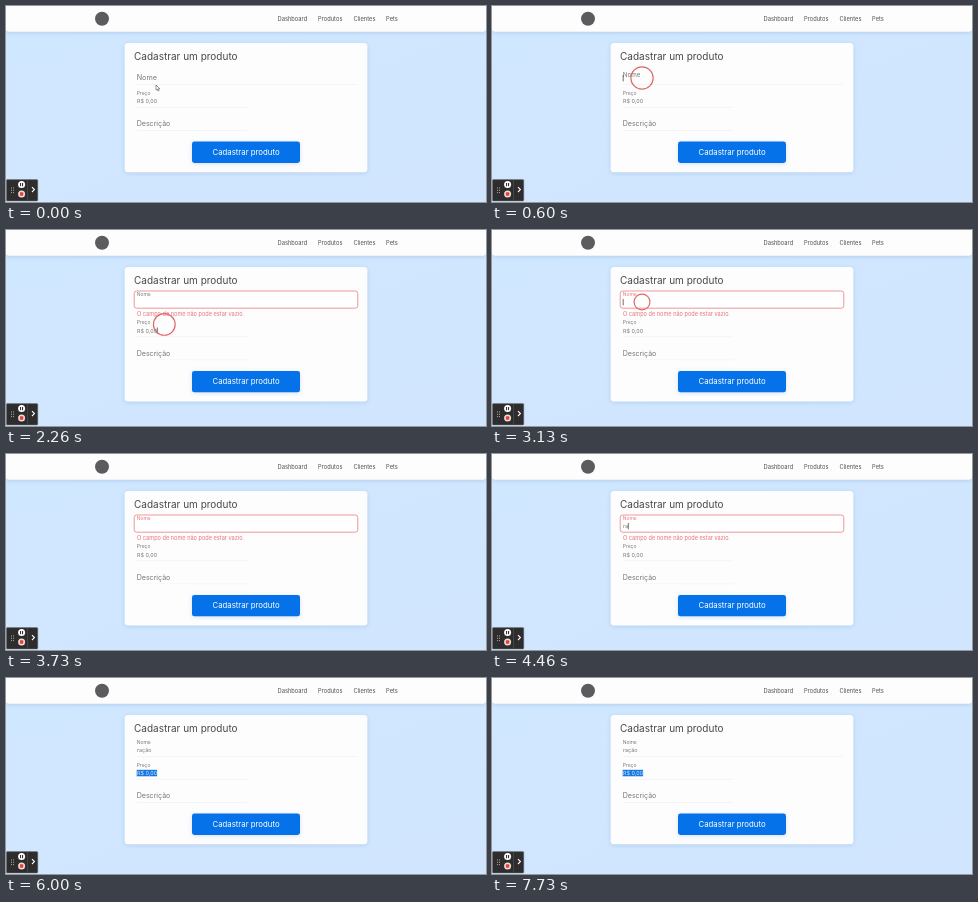
An HTML page for the animation above (8000 ms loop, 480 by 196 pixels).

```html
<!DOCTYPE html>
<html lang="pt-BR">
<head>
<meta charset="utf-8">
<title>Cadastrar um produto</title>
<style>
html, body { margin: 0; width: 100%; height: 100%; overflow: hidden; }
svg { display: block; width: 480px; height: 196px; font-family: Inter, Roboto, sans-serif; }
text { fill: #777; white-space: pre; }
.nav { font-size: 5.75px; fill: #505050; }
.title { font-size: 10px; fill: #484848; }
.field { font-size: 7.05px; }
.label { font-size: 5px; }
.value { font-size: 5.45px; }
.error { font-size: 5.6px; fill: #e8737b; }
.button { font-size: 7.8px; fill: #fff; }
.line { stroke: #eceeef; stroke-width: .6; }
.soft { filter: drop-shadow(0 1px 2px rgba(60, 110, 170, .2)); }
</style>
</head>
<body>
<svg viewBox="0 0 480 196">
  <defs>
    <linearGradient id="sky" x2="1" y2="1">
      <stop stop-color="#cfe7ff"/><stop offset="1" stop-color="#d1e6fe"/>
    </linearGradient>
  </defs>
  <rect width="480" height="196" fill="url(#sky)"/>

  <rect class="soft" y="-6" width="480" height="31.7" rx="3" fill="#fdfdfe"/>
  <circle cx="96" cy="12.7" r="7" fill="#5b5b60"/>
  <g class="nav">
    <text class="nav" x="271.5" y="15">Dashboard</text>
    <text class="nav" x="312" y="15">Produtos</text>
    <text class="nav" x="347.5" y="15">Clientes</text>
    <text class="nav" x="380" y="15">Pets</text>
  </g>

  <rect id="card" class="soft" x="118.6" y="37" width="242.8" height="129.2" rx="3.5" fill="#fdfdfe"/>
  <text class="title" x="128" y="54.3">Cadastrar um produto</text>

  <path id="nameLine" class="line" d="M131 78.5H351"/>
  <rect id="errorBox" x="128.2" y="61" width="223.6" height="17.2" rx="2.6" fill="#fff" stroke="#eb8d90" stroke-width=".9"/>
  <text id="nameLabel" x="130.7">Nome</text>
  <text id="name" class="value" x="131" y="74"></text>
  <text id="errorText" class="error" x="131" y="86.1">O campo de nome não pode estar vazio.</text>

  <g id="rest">
    <text class="label" x="130.7" y="89.1">Preço</text>
    <rect id="selection" x="130.7" y="91.8" width="20.4" height="6.5" fill="#1878df"/>
    <text id="price" class="value" x="131" y="97.2">R$ 0,00</text>
    <path class="line" d="M131 101.3H241M131 124.5H241"/>
    <text class="field" x="130.7" y="120.4">Descrição</text>
    <rect class="soft" x="186" y="135.5" width="108" height="21.4" rx="2.4" fill="#0672e9"/>
    <text class="button" x="240" y="149.1" text-anchor="middle">Cadastrar produto</text>
  </g>

  <path id="caret" stroke="#333" stroke-width=".7"/>
  <circle id="ripple" fill="none" stroke="#df6868" stroke-width="1.2"/>
  <path id="pointer" d="M0 0V5.2L1.3 4.1L2.2 6L3.1 5.6L2.2 3.8H3.8Z" fill="#fff" stroke="#333" stroke-width=".5"/>

  <rect x=".4" y="173.6" width="31.4" height="21.4" rx="1" fill="#2d2d2d" stroke="#777" stroke-width=".5"/>
  <path d="M21.5 174V194.8" stroke="#555" stroke-width=".6"/>
  <path d="M5 182H8M5 184.3H8M5 186.6H8" stroke="#aaa" stroke-dasharray="1 1" stroke-width="1"/>
  <circle cx="15.6" cy="178.6" r="3.5" fill="#fff"/>
  <path d="M14.6 177V180.2M16.6 177V180.2" stroke="#222"/>
  <circle cx="15.6" cy="188" r="3.5" fill="#f4d9d7"/>
  <rect x="13.9" y="186.3" width="3.4" height="3.4" rx=".6" fill="#d8433b"/>
  <path d="M26 181.2L28.4 183.6L26 186" fill="none" stroke="#fff" stroke-width="1.1"/>
</svg>
<script>
const LOOP = 8000, BLINK = 530;
const FOCUS = [[530, 'name'], [2130, 'price'], [3130, 'name'], [5860, 'none']];
const CLICKS = [[460, 150, 72], [2130, 158.3, 94.4], [3100, 150, 72]];
const KEYS = [[4200, 'r'], [4460, 'ra'], [4730, 'raç'], [5400, 'raçã'], [5600, 'ração']];
const FAIL = 2130, VALID = 5860, SHIFT = 5.4;

const el = {};
document.querySelectorAll('[id]').forEach(e => el[e.id] = e);
const set = (e, attrs) => Object.entries(attrs).forEach(([k, v]) => e.setAttribute(k, v));
const show = (e, on) => e.style.visibility = on ? 'visible' : 'hidden';
const part = (t, from, length) => Math.max(0, Math.min(1, (t - from) / length));
const ease = p => p * p * (3 - 2 * p);
const last = (steps, t) => steps.filter(s => s[0] <= t).pop();

function draw(t) {
  const failed = t >= FAIL && t < VALID;
  const shift = failed ? SHIFT : 0;
  set(el.card, { height: 129.2 + shift });
  set(el.rest, { transform: `translate(0 ${shift})` });
  show(el.errorBox, failed);
  show(el.errorText, failed);
  show(el.nameLine, !failed);

  const up = ease(part(t, 530, 170));
  set(el.nameLabel, { y: 74.4 - 8.2 * up, 'font-size': 7.2 - 2.2 * up });
  el.nameLabel.style.fill = failed && t >= 2400 ? '#e8737b' : '#777';

  const key = last(KEYS, t);
  el.name.textContent = key ? key[1] : '';
  show(el.selection, t >= VALID);
  el.price.style.fill = t >= VALID ? '#d5e8fb' : '#777';

  const focus = last(FOCUS, t);
  const since = focus ? t - Math.max(focus[0], key ? key[0] : 0) : 0;
  const lit = focus && focus[1] !== 'none' && Math.floor(since / BLINK) % 2 === 0;
  show(el.caret, lit);
  if (lit) {
    const inName = focus[1] === 'name';
    const x = 131 + (inName ? el.name : el.price).getComputedTextLength() + .2;
    set(el.caret, { d: `M${x} ${inName ? 69 : 92 + shift}v6.4` });
  }

  const click = last(CLICKS, t);
  const p = click ? part(t, click[0], 340) : 1;
  show(el.ripple, p < 1);
  if (click) set(el.ripple, {
    cx: click[1], cy: click[2], r: 7 + 10 * Math.min(p, .45), opacity: 1 - part(p, .55, .45)
  });

  show(el.pointer, t < 530);
  set(el.pointer, { transform: `translate(150 ${79 - 7 * ease(part(t, 60, 400))})` });
}

function tick() {
  draw(performance.now() % LOOP);
  requestAnimationFrame(tick);
}
tick();
</script>
</body>
</html>
```
